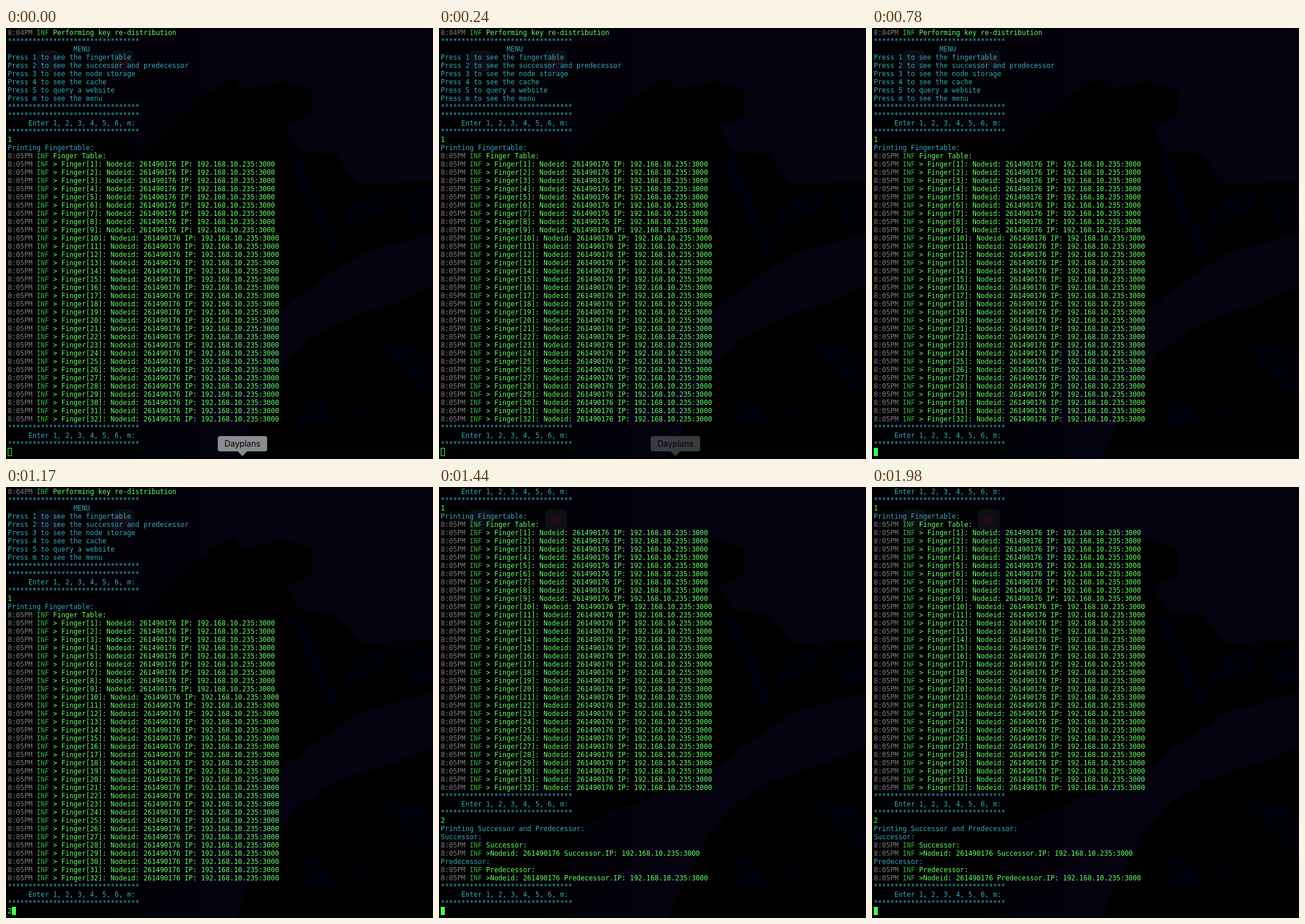
Animation of 726x734 px, one loop 2550 ms. Source, as an HTML page:

```html
<!DOCTYPE html>
<html lang="en">
<head>
<meta charset="utf-8">
<title>Terminal session</title>
<style>
  html, body { margin: 0; width: 100%; height: 100%; overflow: hidden; background: #000; }
  #stage { position: relative; width: 726px; height: 734px; overflow: hidden; }
  #stage > * { position: absolute; }
  svg { left: 0; top: 0; }
  pre {
    left: 3px; top: 1px; margin: 0; color: #36a9bd;
    font: 11.628px/14px "DejaVu Sans Mono", monospace;
  }
  pre i { font-style: normal; color: #7e7e80; }
  pre b { font-weight: normal; color: #38b443; }
  pre u { text-decoration: none; color: #66ff66; }
  #cursor { top: 715px; width: 7px; height: 14px; box-sizing: border-box; border: 1px solid #45f94f; }
  #tip {
    left: 360px; top: 695px; width: 84px; height: 26px; border-radius: 4px;
    background: #8c8c90; color: #000; text-align: center;
    font: 14px/26px Inter, sans-serif;
  }
  #tip::after {
    content: ""; position: absolute; left: 34px; top: 26px;
    border: 8px solid transparent; border-top-color: #8c8c90; border-bottom: 0;
  }
</style>
</head>
<body>
<div id="stage">
  <svg width="726" height="734">
    <defs>
      <linearGradient id="sky">
        <stop offset=".2" stop-color="#010104"/>
        <stop offset=".5" stop-color="#04020e"/>
        <stop offset="1" stop-color="#05030f"/>
      </linearGradient>
      <filter id="soft"><feGaussianBlur stdDeviation="1.5"/></filter>
    </defs>
    <rect width="726" height="734" fill="url(#sky)"/>
    <g filter="url(#soft)">
      <path d="M330 120L385 85 405 105 470 90 520 105 520 150 475 170 500 210 560 215 600 265 726 262V350L610 382Q540 420 470 480L380 520 230 580V220Z"/>
      <path d="M600 290L655 275 640 315 560 345ZM665 290L726 270V330L690 340ZM480 225L500 215 570 370 555 385Z" fill="#04020d"/>
      <path d="M726 440L660 470Q540 500 490 555T390 734H726Z"/>
      <path d="M632 533L700 540 726 565V625L690 600ZM515 618L566 675 495 680ZM566 655L595 645 625 651 610 658Z" fill="#04020d"/>
      <path d="M0 200H220V734H0Z"/>
    </g>
    <g fill="#111113" filter="url(#soft)">
      <rect x="52" y="38" width="38" height="36" rx="8"/>
      <rect x="180" y="38" width="38" height="36" rx="8"/>
      <rect x="189" y="47" width="20" height="16" rx="5" fill="#1a1115"/>
    </g>
  </svg>
  <pre id="log"></pre>
  <div id="cursor"></div>
  <div id="tip">Dayplans</div>
</div>
<script>
const LOOP = 2550, FOCUS = 780, TYPED = 1170, ENTERED = 1440;
const FADE_START = 30, FADE_END = 390;
const $ = id => document.getElementById(id);

const stars = "*".repeat(32);
const prompt = [stars, "     Enter 1, 2, 3, 4, 5, 6, m:", stars];
const input = key => `<u>${key}</u>`;
const info = (text, time = "8:05PM") =>
  `<i>${time}</i> <b>INF</b> <u>${text.replace(">", "&gt;")}</u>`;
const node = "Nodeid: 261490176 ", ip = "IP: 192.168.10.235:3000";

const session = [
  info("Performing key re-distribution", "8:04PM"),
  stars,
  " ".repeat(16) + "MENU",
  "Press 1 to see the fingertable",
  "Press 2 to see the successor and predecessor",
  "Press 3 to see the node storage",
  "Press 4 to see the cache",
  "Press 5 to query a website",
  "Press m to see the menu",
  stars,
  ...prompt,
  input(1),
  "Printing Fingertable:",
  info("Finger Table:"),
  ...Array.from({ length: 32 }, (_, i) => info(`> Finger[${i + 1}]: ${node}${ip}`)),
  ...prompt
];
const reply = [
  "Printing Successor and Predecessor:",
  ...["Successor", "Predecessor"].flatMap(name => [
    name + ":", info(name + ":"), info(`>${node}${name}.${ip}`)
  ]),
  ...prompt
];
const scrolled = reply.length + 1;

let shown = -1;
function draw(now) {
  const t = now % LOOP;
  const step = (t >= TYPED) + (t >= ENTERED);
  if (step !== shown) {
    shown = step;
    const lines = [...session, ...(step ? [input(2)] : []), ...(step > 1 ? reply : [])];
    $("log").innerHTML = lines.slice(step > 1 ? scrolled : 0).join("\n");
    $("cursor").style.left = (step === 1 ? 10 : 3) + "px";
  }
  $("cursor").style.background = t >= FOCUS ? "#45f94f" : "none";
  const fade = (t - FADE_START) / (FADE_END - FADE_START);
  $("tip").style.opacity = 1 - Math.min(1, Math.max(0, fade));
  requestAnimationFrame(draw);
}
draw(performance.now());
</script>
</body>
</html>
```
